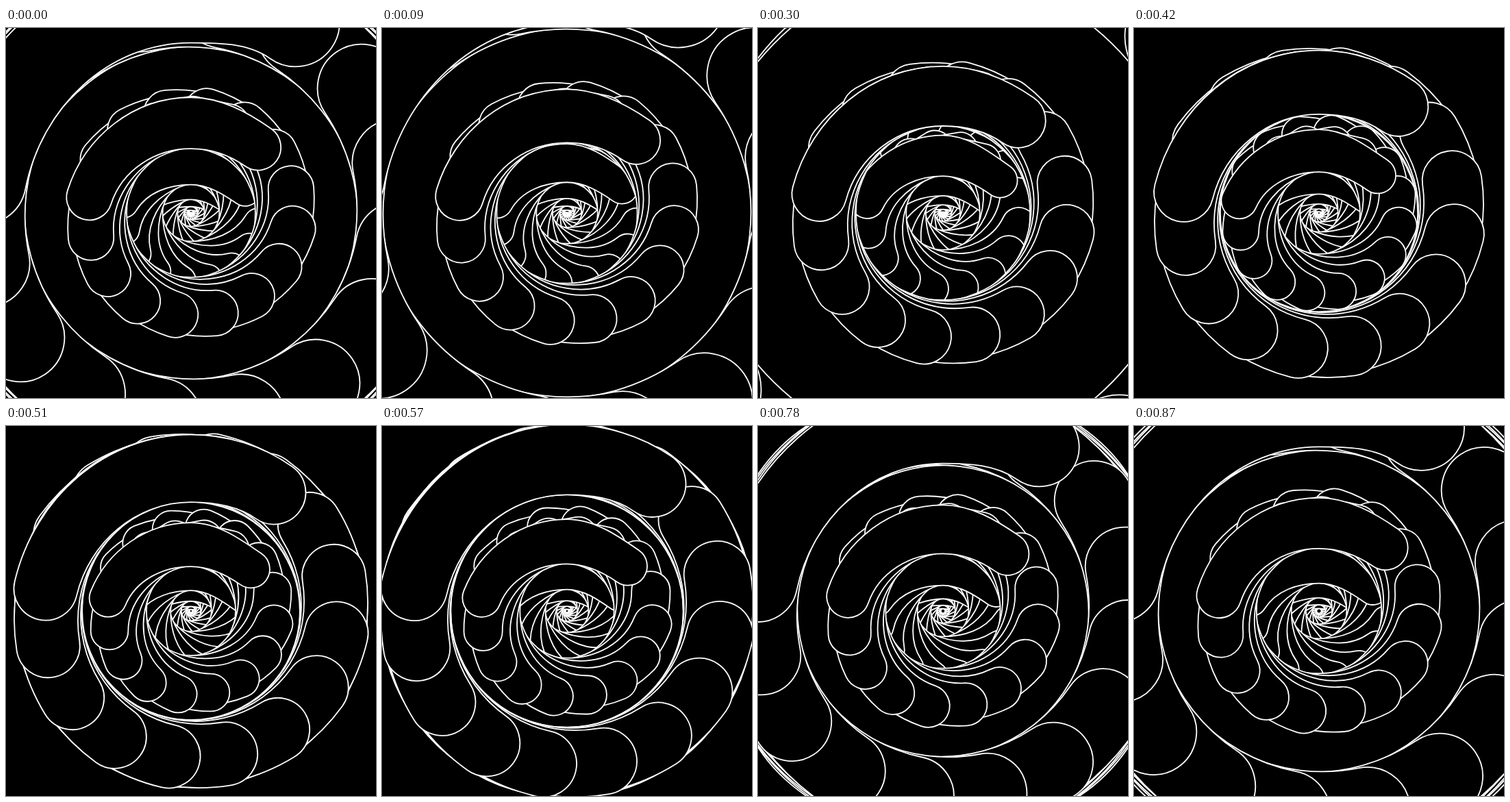
Animation, 540 px wide and 540 px high, one loop 0.9 s. Source, as an HTML page with a canvas:

```html
<!DOCTYPE html>
<html>
<head>
<meta charset="utf-8">
<style>
  html, body { margin: 0; height: 100%; overflow: hidden; background: #000; }
  canvas { display: block; }
</style>
</head>
<body>
<canvas width="540" height="540"></canvas>
<script>
const ctx = document.querySelector('canvas').getContext('2d');
const LOOP = 900, STEP = 30, PETALS = 16;
const rad = deg => deg * Math.PI / 180;
const polar = (x, y, radius, angle) => [x + radius * Math.cos(angle), y + radius * Math.sin(angle)];

// Near-circular cubic from p to q, leaving along angle a and arriving along angle b.
function bend(path, p, a, q, b) {
  const chord = Math.hypot(q[0] - p[0], q[1] - p[1]);
  const h = chord / (3 * Math.cos((b - a) / 4) ** 2);
  path.bezierCurveTo(...polar(...p, h, a), ...polar(...q, -h, b), ...q);
}

// Curved capsule that grows as its inner edge moves out to radius r.
function petal(r) {
  const cap = 14 + 0.207 * r;
  const head = polar(0, 0, 62.4 + 0.9 * r + 0.00047 * r * r, rad(171.2));
  const tail = [64 + 0.365 * r, 1.218 * r - 17.6];
  const a = rad(Math.max(20, 83 - 1000 / r));
  const b = rad(-35);
  const quarter = Math.PI / 2;
  const inner = [0, r + (r / 100) ** 2], outer = [0, 38.5 + 1.4 * r];

  const path = new Path2D();
  path.arc(...head, cap, a + quarter, a + 3 * quarter);
  bend(path, polar(...head, cap, a - quarter), a, inner, 0);
  bend(path, inner, 0, polar(...tail, cap, b - quarter), b);
  path.arc(...tail, cap, b - quarter, b + quarter);
  bend(path, polar(...tail, cap, b + quarter), b + Math.PI, outer, Math.PI);
  bend(path, outer, Math.PI, polar(...head, cap, a + quarter), a + Math.PI);
  path.closePath();
  return path;
}

function draw(time) {
  ctx.setTransform(1, 0, 0, 1, 0, 0);
  ctx.fillStyle = '#000';
  ctx.fillRect(0, 0, 540, 540);
  ctx.strokeStyle = '#fff';
  ctx.lineWidth = 1.8;
  for (let layer = -4; layer <= 2; layer++) {
    const age = time + layer * LOOP;
    const shape = petal((0.3835 - 7.3e-5 * age) ** -4 - 5);
    for (let i = PETALS - 1; i >= 0; i--) {
      ctx.setTransform(1, 0, 0, -1, 270, 270);
      ctx.rotate(i * 2 * Math.PI / PETALS);
      ctx.fill(shape);
      ctx.stroke(shape);
    }
  }
}

function tick() {
  draw(Math.floor(performance.now() % LOOP / STEP) * STEP);
  requestAnimationFrame(tick);
}
tick();
</script>
</body>
</html>
```
